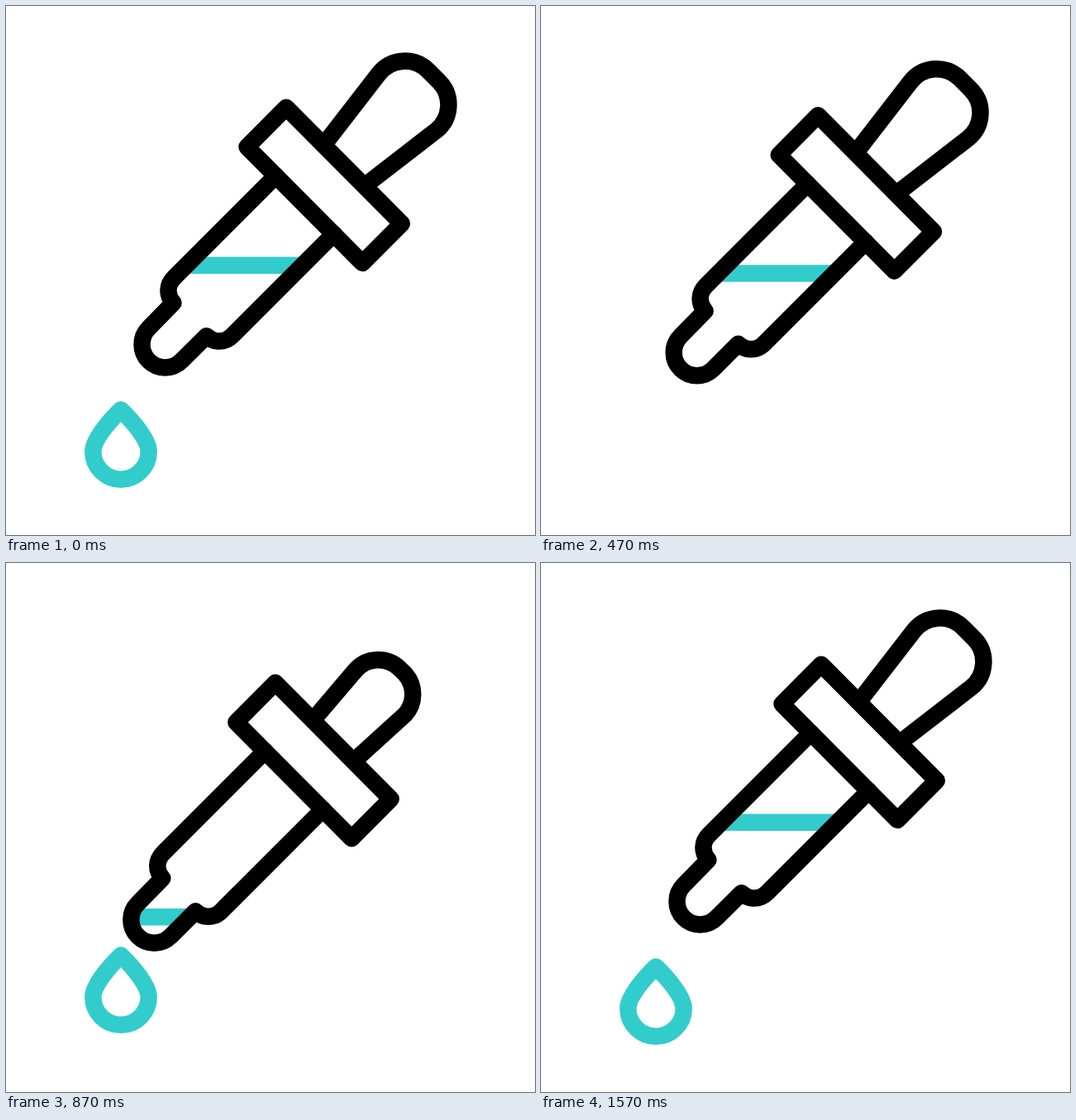
An HTML page that plays this animation: 640 by 640 pixels, repeating every 1670 ms.

```html
<!DOCTYPE html>
<html lang="en">
<head>
<meta charset="utf-8">
<title>Dropper</title>
<style>
  html, body { margin: 0; width: 100%; height: 100%; overflow: hidden; background: #fff; }
  svg { display: block; width: 100vw; height: 100vh; }
  path { fill: none; stroke: #000; stroke-width: 20.5; stroke-linejoin: round; stroke-linecap: round; }
  .liquid { stroke: #3cc; stroke-linecap: butt; }
</style>
</head>
<body>
<svg viewBox="0 0 640 640">
  <defs>
    <path id="glass" d="M326.5 205.5L203.5 328.5C194.5 337.5 194 350 202.5 359.2L172.7 389.7A28 28 0 0 0 212.3 429.3L242.5 399.2C251 407.5 264.5 408 273.5 399L396.7 275.8"/>
    <clipPath id="inside"><use href="#glass"/></clipPath>
  </defs>
  <path id="drop" class="liquid" d="M139 488.5C125 502 105.3 525 105.3 539A33.7 33.7 0 0 0 172.7 539C172.7 525 153 502 139 488.5Z"/>
  <g id="dropper">
    <g clip-path="url(#inside)"><path id="level" class="liquid" d="M140 313.8H400"/></g>
    <use href="#glass"/>
    <path id="bulb"/>
    <path d="M291.5 170.5L339 122.7L478.8 263.3L431.3 311Z"/>
  </g>
</svg>
<script>
const LOOP = 1670;
const DIP = 333, LIFT = 567, PRESS = 800, SETTLE = 1033;
const [drop, dropper, level, bulb] =
  ['drop', 'dropper', 'level', 'bulb'].map(id => document.getElementById(id));

// Eased progress from 0 to 1 between two times.
function ease(t, from, to) {
  const u = Math.min(1, Math.max(0, (t - from) / (to - from)));
  return u * u * (3 - 2 * u);
}

const shift = (el, x, y) => el.setAttribute('transform', `translate(${x} ${y})`);

// The two rounded ends of the bulb move towards the collar when squeezed.
function bulbPath(squeeze) {
  const point = (x, y, dx, dy) => `${x + dx * squeeze} ${y + dy * squeeze}`;
  const radius = 40 - 4 * squeeze;
  const arc = `A${radius} ${radius} 0 0 1 `;
  return 'M384.5 168L' + point(451, 82, -20, 33.5) +
    arc + point(511, 78.5, -27.5, 35) +
    'L' + point(523.5, 91, -35, 27.5) +
    arc + point(520, 151, -30.8, 13) + 'L434 217.5';
}

function draw(t) {
  const dip = ease(t, 0, DIP) - ease(t, DIP, LIFT);
  const lift = ease(t, DIP, LIFT) - ease(t, LIFT, PRESS);
  const press = ease(t, LIFT, PRESS) - ease(t, PRESS, SETTLE);
  shift(dropper, -22.2 * dip + 6.8 * lift - 16.9 * press, 32.3 * dip - 3.5 * lift + 28.5 * press);

  const squeeze = ease(t, LIFT - 12, PRESS) - ease(t, PRESS, SETTLE);
  bulb.setAttribute('d', bulbPath(squeeze));

  const drained = ease(t, LIFT, SETTLE);
  shift(level, 0, 128 * (drained - ease(t, 1060, 1567)));

  const fallen = t < LIFT ? ease(t, 0, DIP) : drained - 1;
  shift(drop, 0, 50 * fallen);
  drop.setAttribute('opacity', 1 - ease(t, 200, 320) + ease(t, 625, 750));
}

const start = performance.now();
function tick() {
  draw((performance.now() - start) % LOOP);
  requestAnimationFrame(tick);
}
tick();
</script>
</body>
</html>
```
